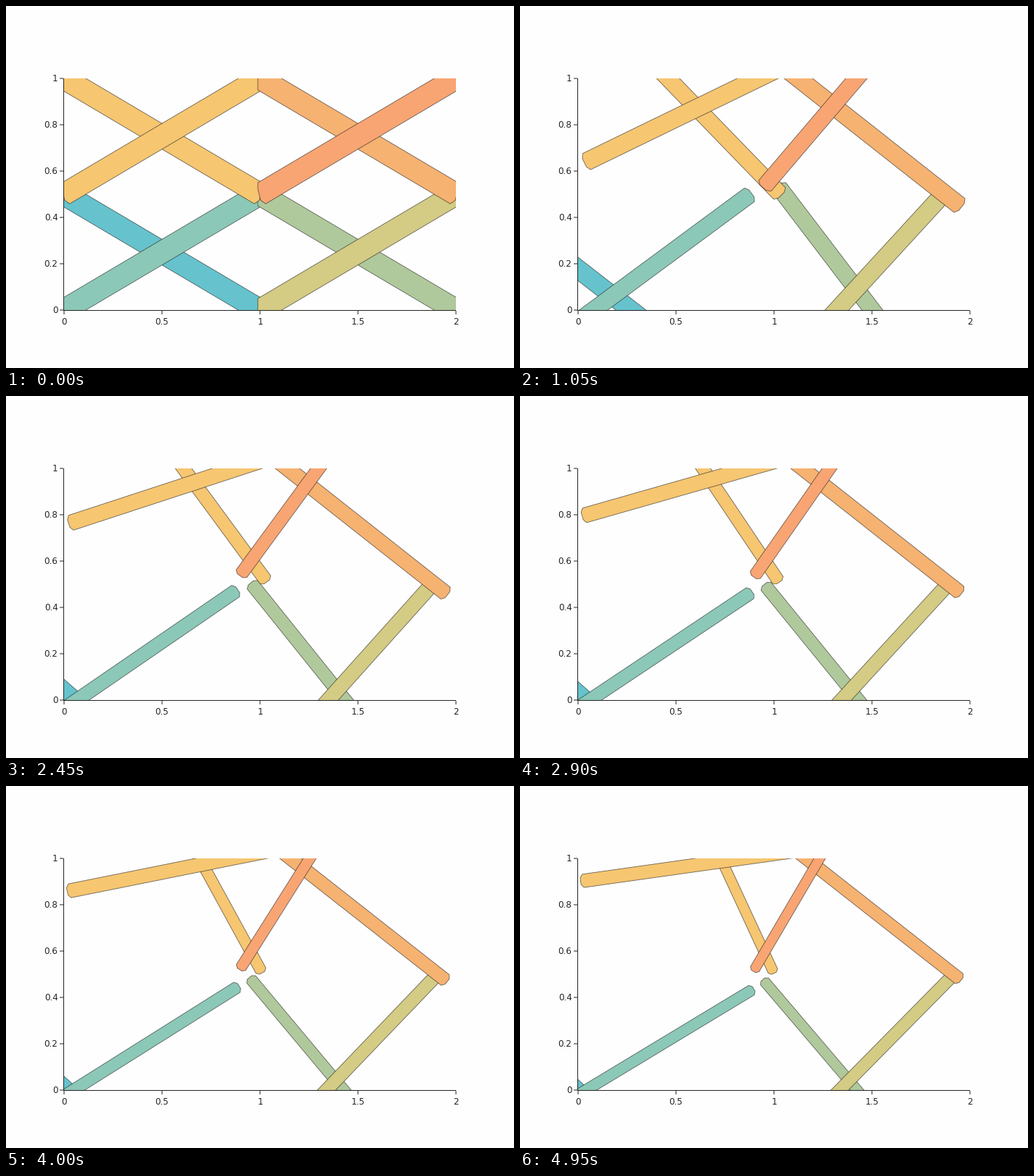
These frames come from a looping animation (700 by 500 pixels, 5 s). A matplotlib script:

```python
import numpy as np
import matplotlib.pyplot as plt
from matplotlib.animation import FuncAnimation
from matplotlib.patches import Polygon, Rectangle

W, H, DPI = 700, 500, 100
LEFT, RIGHT, TOP, BOTTOM = 80, 620, 100, 420
CELL, MIDDLE = (RIGHT - LEFT) / 2, (TOP + BOTTOM) / 2
FRAMES, INTERVAL = 100, 50
PX = 72 / DPI
START_WIDTH, BULGE, MARGIN = 30.6, 3.5, 3
INK = "#242424"

plt.rcParams["font.family"] = "DejaVu Sans"
fig = plt.figure(figsize=(W / DPI, H / DPI), dpi=DPI, facecolor="#fefefe")
ax = fig.add_axes([0, 0, 1, 1])
ax.set(xlim=(0, W), ylim=(H, 0))
ax.axis("off")


def log_time(step):
    """The fit moves fast at first, then settles."""
    return np.log1p(np.asarray(step) / 10)


KNOTS = log_time([0, 9, 33, FRAMES - 1])


class Bar:
    """A strip with one free end; the other end runs off the plot.

    It starts as a diagonal of its cell and drifts through a few poses:
    the middle of the free end, and where the axis crosses the edge row.
    """

    def __init__(self, color, edge, column, free_right, end_width, *poses):
        self.edge, self.end_width = edge, end_width
        self.cell = LEFT + column * CELL + np.array([0, CELL])
        free, fixed = self.cell[::-1] if free_right else self.cell
        self.tracks = np.transpose([(free, MIDDLE, fixed), *poses])
        self.patch = Polygon(np.zeros((6, 2)), closed=True, fc=color,
                             ec=(0.1, 0.1, 0.1, 0.6), lw=0.9 * PX,
                             joinstyle="round")
        ax.add_patch(self.patch)
        self.patch.set_clip_path(Rectangle(
            (LEFT, TOP), RIGHT - LEFT, BOTTOM - TOP, transform=ax.transData))

    def update(self, step):
        u = log_time(step)
        x, y, cross = [np.interp(u, KNOTS, track) for track in self.tracks]
        width = np.interp(u, KNOTS[[0, -1]], [START_WIDTH, self.end_width])
        tip = np.array([x, y])
        along = np.array([cross, self.edge]) - tip
        along /= np.hypot(*along)
        across = np.array([-along[1], along[0]]) * width

        # distance along the axis, and across it as a share of the width
        outline = [(W, -.5), (0, -.5), (-BULGE, -.25),
                   (-BULGE, .25), (0, .5), (W, .5)]
        points = np.array([tip + s * along + v * across for s, v in outline])

        # the strip is confined to its cell at first, then set free
        reach = MARGIN + 60 * u
        xs = points[:, 0]
        shift = np.clip(xs, self.cell[0] - reach, self.cell[1] + reach) - xs
        self.patch.set_xy(points + np.outer(shift / along[0], along))


bars = [
    Bar("#66c3cd", BOTTOM, 0, False, 20,
        (66, 299, 227.5), (66, 388, 103), (66, 406, 81)),
    Bar("#8cc8b7", BOTTOM, 0, True, 15.3,
        (318, 257.5, 101.5), (315, 263, 101), (319, 282, 91)),
    Bar("#b0c99c", BOTTOM, 1, False, 14.5,
        (381, 243, 511), (341, 256, 468.5), (337, 270, 464.5)),
    Bar("#d4cb84", BOTTOM, 1, True, 17.2,
        (596, 248, 422.5), (585, 256.5, 446), (599, 259, 440.5)),
    Bar("#f6c671", TOP, 0, True, 14.2,
        (351, 267.5, 168), (362, 253, 228), (348.5, 255.5, 276.7)),
    Bar("#f6c671", TOP, 0, False, 18.5,
        (93, 240.5, 332.5), (91, 197.7, 324.5), (87, 131, 307)),
    Bar("#f6b271", TOP, 1, True, 17.5,
        (605, 275.5, 382), (606, 275.5, 384.5), (605, 266, 394)),
    Bar("#f8a573", TOP, 1, False, 13.8,
        (356, 258.7, 499), (325, 241.5, 440), (323.5, 253, 413)),
]


def rule(xs, ys):
    ax.plot(xs, ys, color=INK, lw=PX, solid_capstyle="butt", zorder=5,
            snap=False)


def draw_axes():
    rule([LEFT - .5] * 2, [TOP, BOTTOM])
    rule([LEFT - 1, RIGHT], [BOTTOM + .5] * 2)
    style = dict(fontsize=12 * PX, color=INK, va="baseline")
    for v in np.linspace(0, 2, 5):
        x = LEFT + CELL * v
        rule([x, x], [BOTTOM + 1, BOTTOM + 6])
        ax.text(x, BOTTOM + 20.4, f"{v:g}", ha="center", **style)
    for v in np.linspace(0, 1, 6):
        y = BOTTOM - (BOTTOM - TOP) * v
        rule([LEFT - 6, LEFT - 1], [y, y])
        ax.text(LEFT - 8.4, y + 4.2, f"{v:g}", ha="right", **style)


def update(step):
    for bar in bars:
        bar.update(step)
    return [bar.patch for bar in bars]


draw_axes()
anim = FuncAnimation(fig, update, frames=FRAMES, interval=INTERVAL,
                     repeat=True, repeat_delay=0, blit=False)
plt.show()
```
